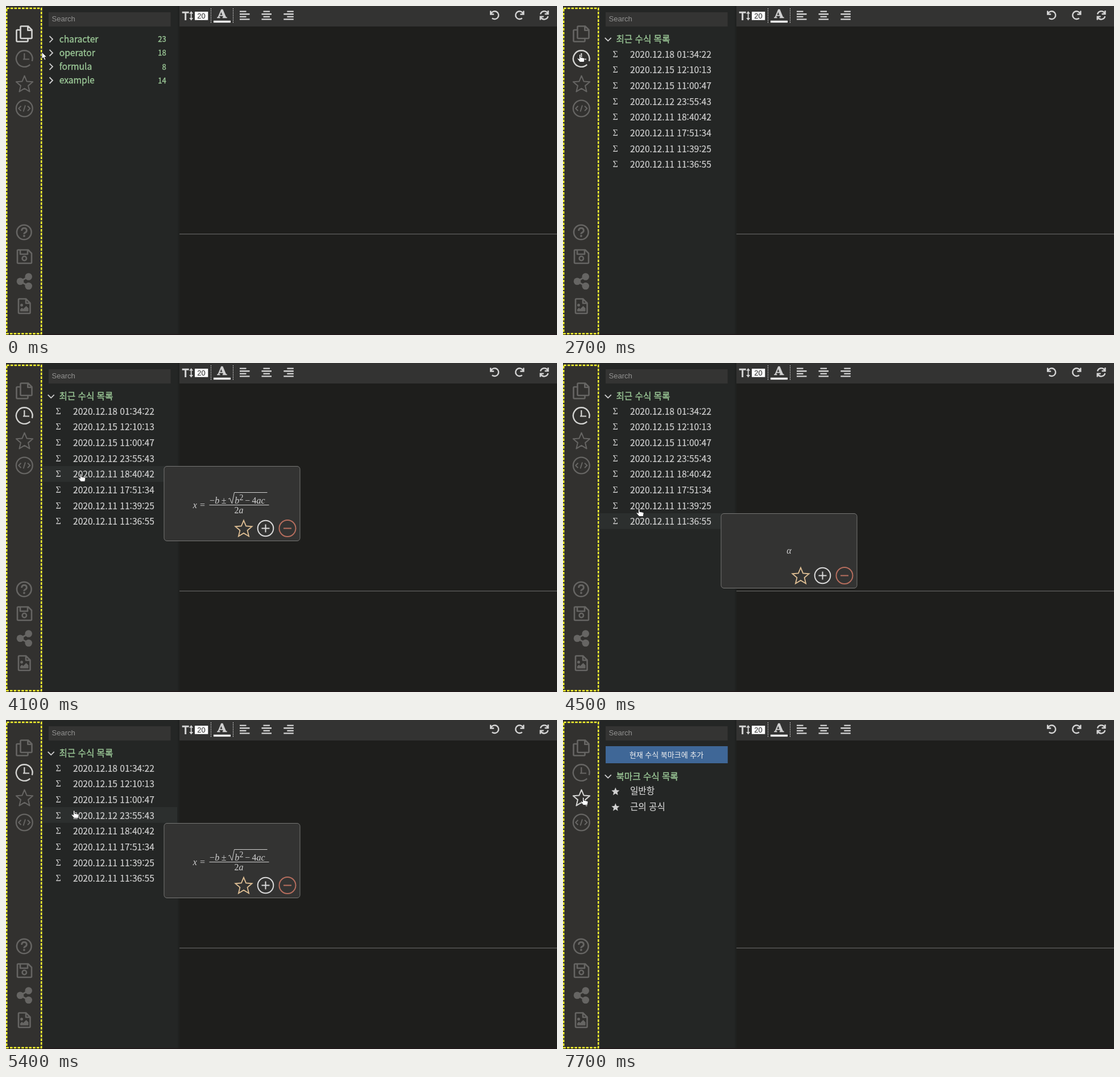
Write an HTML page that moves like this. It is 969 px wide and 578 px high and loops after 8000 ms.

```html
<!DOCTYPE html>
<html lang="ko">
<head>
<meta charset="utf-8">
<title>Formula editor</title>
<style>
html, body { margin: 0; width: 100%; height: 100%; overflow: hidden; background: #1e1e1c; }
svg { display: block; }
text { font-family: "Noto Sans CJK KR", "Noto Sans CJK JP", "Noto Sans CJK", sans-serif; font-size: 15.6px; fill: #d0d0d0; }
.arial { font-family: "Liberation Sans", Arial, sans-serif; font-size: 13px; }
.serif { font-family: "Liberation Serif", Times, serif; font-size: 16px; }
.it { font-style: italic; }
.green { fill: #9bc897; stroke: #9bc897; stroke-width: .35; }
.date { stroke: #d0d0d0; stroke-width: .2; }
.count { font-size: 13.1px; text-anchor: end; }
.line { fill: none; stroke: #d0d0d0; stroke-width: 1.8; }
.icon { color: #666563; }
.icon.on { color: #d4d4d2; }
.icon, .tools { fill: none; stroke: currentColor; stroke-width: 2.6; stroke-linejoin: round; }
.icon .solid { fill: currentColor; stroke: none; }
.tools { color: #d4d4d4; stroke-width: 2.4; stroke-linejoin: miter; }
.over text { fill: #c4e2c0; }
</style>
</head>
<body>
<svg width="969" height="578" viewBox="0 0 969 578">
  <rect width="969" height="578" fill="#1e1e1c"/>
  <rect width="65" height="578" fill="#32312f"/>
  <rect x="65" width="240" height="578" fill="#242625"/>
  <rect x="302" width="3" height="578" fill="#202221"/>
  <rect x="305" width="664" height="36" fill="#333332"/>
  <rect x="305" y="400" width="664" height="1.2" fill="#636362"/>
  <rect y="576.5" width="969" height="1.5" fill="#22181b"/>
  <rect x="75" y="11" width="214.5" height="25" fill="#343433"/>
  <text class="arial" x="80.5" y="27.3" style="fill:#929291">Search</text>

  <g class="icon" id="files">
    <path d="M27 35.5h12l6.5 6.5v13.5q0 1.5-1.5 1.5h-17q-1.5 0-1.5-1.5V37q0-1.5 1.5-1.5zM38.3 36v6.7h7M25 42h-5q-1.5 0-1.5 1.5V61q0 1.5 1.5 1.5h17q1.5 0 1.5-1.5v-4"/>
  </g>
  <g class="icon" id="clock">
    <path d="M42.2 102.8A14.3 14.3 0 1 1 45.9 96.8" stroke-width="2.4"/>
    <path d="M32.3 83v10.7M30 93.5h11" stroke-width="2.2"/>
  </g>
  <g class="icon" id="star"><path class="star" transform="translate(32.5 138)" stroke-width="2"/></g>
  <g class="icon">
    <circle cx="32.3" cy="180" r="14.4" stroke-width="2.3"/>
    <path d="M26.5 175.8l-4.3 4.2 4.3 4.2M38 175.8l4.3 4.2-4.3 4.2M34 174.5l-3.5 11" stroke-width="2"/>
  </g>
  <g class="icon">
    <circle cx="31.8" cy="397.5" r="12.8"/>
    <path d="M27.5 394.8q.4-4.5 4.5-4.5t4.3 3.9q0 2.500-2.300 3.700t-2 2.800" stroke-width="3"/>
    <circle class="solid" cx="31.9" cy="404" r="1.9"/>
  </g>
  <g class="icon">
    <path d="M21.5 428.5H39l6 6v16q0 1.500-1.500 1.500h-22q-1.500 0-1.500-1.500V430q0-1.500 1.500-1.500zM25 429v7h13v-7"/>
    <circle cx="32.3" cy="443.5" r="3.7"/>
  </g>
  <g class="icon">
    <path d="M39.5 475.500L25 483.800l14.500 8.200" stroke-width="3"/>
    <circle class="solid" cx="39.7" cy="475.5" r="6.3"/>
    <circle class="solid" cx="25" cy="483.8" r="6.3"/>
    <circle class="solid" cx="39.7" cy="492" r="6.3"/>
  </g>
  <g class="icon">
    <path d="M23.500 514.500H35l7.500 7.500v16.500q0 1.500-1.500 1.500H23.500q-1.500 0-1.500-1.500V516q0-1.500 1.500-1.500zM35 515v7.300h7.300"/>
    <circle class="solid" cx="27.5" cy="525.5" r="2.5"/>
    <path class="solid" d="M25 536.500V533l3-3 2.200 2.200 5.300-5.300 4 4v5.600z"/>
  </g>

  <g class="tools">
    <path d="M309.700 11.300h12M315.700 11v14" stroke-width="3"/>
    <path d="M325.700 12v11" stroke-width="1.8"/>
    <path d="M325.700 9l3.500 4.500h-7zM325.700 25.500l3.500-4.500h-7z" fill="currentColor" stroke="none"/>
    <rect x="332" y="10" width="23.3" height="14.7" fill="#fff" stroke="none"/>
    <path d="M360.500 4v27M399.500 4v27" stroke="#e8e8e8" stroke-width="1" stroke-dasharray="1.5 1.5"/>
    <rect x="365" y="25.7" width="30" height="3.5" fill="#fff" stroke="none"/>
    <path d="M411 9.600h11.500M411 14.300h17.500M411 18.900h11.500M411 23.400h17.500"/>
    <path d="M452.500 9.600H464M449.500 14.300H467M452.500 18.900H464M449.500 23.400H467"/>
    <path d="M494.300 9.600h11.500M488.300 14.300h17.500M494.300 18.900h11.500M488.300 23.400h17.500"/>
    <g id="undo"><path d="M852.200 8.500v6h6M853 13.500a6.900 6.900 0 1 1 1.800 7.800"/></g>
    <use href="#undo" transform="matrix(-1 0 0 1 1762.5 0)"/>
    <g id="half"><path d="M940 14.500a6.800 6.800 0 0 1 12.600-1.800M953.500 8v6h-6"/></g>
    <use href="#half" transform="rotate(180 946.6 16.3)"/>
  </g>
  <text class="arial" x="343.6" y="21.6" text-anchor="middle" style="fill:#2a2a2a">20</text>
  <text x="380" y="21.3" text-anchor="middle" stroke="#d0d0d0" stroke-width=".7" style="font:bold 21px 'DejaVu Serif',serif">A</text>

  <g id="tree"></g>
  <g id="recent">
    <rect id="hilite" x="65" width="236" height="27.7" fill="#2c2f2e"/>
    <path class="line" d="M73.700 55.800l5.500 5.500 5.500-5.500"/>
    <text class="green" x="93.5" y="64">최근 수식 목록</text>
    <g id="dates"></g>
  </g>
  <g id="marks">
    <rect x="75" y="46" width="214.7" height="30" fill="#3f6797"/>
    <text x="182" y="66" text-anchor="middle" style="font-size:13px;fill:#f2f2f2">현재 수식 북마크에 추가</text>
    <path class="line" d="M73.700 96.300l5.500 5.500 5.500-5.500"/>
    <text class="green" x="93.5" y="104.5">북마크 수식 목록</text>
    <path class="star" transform="translate(92.3 126) scale(.48)" fill="#d0d0d0"/>
    <path class="star" transform="translate(92.3 153.7) scale(.48)" fill="#d0d0d0"/>
    <text class="date" x="118" y="130.3">일반항</text>
    <text class="date" x="118" y="158">근의 공식</text>
  </g>

  <g id="popup">
    <rect id="card" x="278" y=".5" width="239" height="131" rx="5" fill="#333332" stroke="#777775"/>
    <g id="root">
      <g id="frac"></g>
      <g id="lhs">
        <text class="serif it" x="328.8" y="73.5">x</text>
        <text class="serif" x="341" y="73.5">=</text>
      </g>
    </g>
    <text class="serif it" id="alpha" x="397.5" y="71" text-anchor="middle">α</text>
    <g id="actions" fill="none" stroke-width="2">
      <path class="star" transform="translate(418 111)" stroke="#dfbf94" stroke-width="1.8"/>
      <circle cx="456.5" cy="109.5" r="13.8" stroke="#dadada"/>
      <path d="M449.500 109.500h14M456.500 102.500v14" stroke="#dadada"/>
      <circle cx="495" cy="109.5" r="14.5" stroke="#b76e5e"/>
      <path d="M488 109.500h14" stroke="#b76e5e"/>
    </g>
  </g>

  <rect x="1.2" y="4" width="61" height="571.7" fill="none" stroke="#ffff2e" stroke-width="2.4" stroke-dasharray="4.5 2.2"/>

  <g id="cursor" fill="#fff" stroke="#1a1a1a" stroke-width=".8" stroke-linejoin="round">
    <path id="arrow" d="M0 0v12l2.800-2.500 2 4.600 2.100-.9-2-4.500h3.800z"/>
    <path id="hand" d="M3.500 1.200q0-1.200 1.200-1.200t1.200 1.200v4l6.100 1.200q1.300.4 1 2l-1 5.100H4.800L.4 8.200q-.6-1.200.6-1.600l2.500 1.400z"/>
  </g>
</svg>
<script>
const $ = id => document.getElementById(id);
const show = (id, on) => $(id).style.display = on ? '' : 'none';

const LOOP = 8000, STEP = 100, TOP = 71, ROW = 27.68;

// five-pointed star
let star = 'M';
for (let i = 0; i < 10; i++) {
  const r = i % 2 ? 6.9 : 15.4, a = i * Math.PI / 5;
  star += `${(r * Math.sin(a)).toFixed(2)} ${(-r * Math.cos(a)).toFixed(2)} `;
}
document.querySelectorAll('.star').forEach(p => p.setAttribute('d', star + 'z'));

const groups = [['character', 23], ['operator', 18], ['formula', 8], ['example', 14]];
$('tree').innerHTML = groups.map(([name, n], i) => {
  const y = 24.15 * i;
  return `<g><path class="line" d="M76.5 ${52.8 + y}l5.5 5.5-5.5 5.5"/>
    <text class="green" x="93.7" y="${63.8 + y}">${name}</text>
    <text class="green count" x="281.8" y="${63.3 + y}">${n}</text></g>`;
}).join('');
const operator = $('tree').children[1];

const dates = ['18 01:34:22', '15 12:10:13', '15 11:00:47', '12 23:55:43',
  '11 18:40:42', '11 17:51:34', '11 11:39:25', '11 11:36:55'];
$('dates').innerHTML = dates.map((d, i) => {
  const y = 90.5 + ROW * i;
  return `<text class="serif" x="87.5" y="${y - 1}">Σ</text><text class="date" x="118" y="${y}">2020.12.${d}</text>`;
}).join('');

const glyph = (s, x, y, italic, size = 16) =>
  `<text class="serif ${italic ? 'it' : ''}" x="${x}" y="${y}" style="font-size:${size}px">${s}</text>`;
$('frac').innerHTML =
  glyph('−', 345.5, 66) + glyph('b', 354.8, 66, true) + glyph('±', 366.2, 66) +
  glyph('b', 389.8, 66, true) + glyph('2', 398, 60, false, 14) + glyph('−', 407.8, 66) +
  glyph('4', 420, 66) + glyph('ac', 428, 66, true) +
  glyph('2', 389, 82.5) + glyph('a', 397, 82.5, true) +
  '<path class="line" style="stroke-width:1" d="M345 68.500h105M378.500 58l2.500-1.500 4 9.500 4-19.500h58"/>';

// time, x, y of the pointer's top left corner
const path = [
  [0, 63, 81], [100, 62, 79.5], [800, 62, 79.5], [900, 42, 84], [1000, 23, 85.5],
  [1100, 23, 85.5], [1200, 19, 85.5], [2600, 19, 85.5], [2700, 25, 85], [2800, 52, 78],
  [2900, 88, 76], [3000, 108, 78], [3200, 108, 78], [3300, 113, 90], [3400, 118, 102],
  [3500, 118, 102], [3600, 124, 118], [4500, 129, 256], [4600, 131, 262], [4700, 129, 250],
  [4900, 124, 215], [5000, 124, 215], [5400, 115, 159], [5500, 115, 159], [6300, 31, 136], [LOOP, 31, 136]
];

function pointer(t) {
  const i = path.findIndex(p => p[0] > t);
  const [t0, x0, y0] = path[i - 1], [t1, x1, y1] = path[i];
  const k = (t - t0) / (t1 - t0);
  return [x0 + (x1 - x0) * k, y0 + (y1 - y0) * k];
}

const panelAt = t => t < 2300 ? 0 : t < 7700 ? 1 : 2;
const rowTop = row => Math.round(TOP - .6 + ROW * row);

function rowAt(t) {
  const [x, y] = pointer(t);
  return panelAt(t) === 1 && x > 66 ? Math.floor((y + 9 - TOP) / ROW) : -1;
}

function drawPopup(row) {
  show('popup', row >= 0);
  if (row < 0) return;
  const extra = row ? 0 : 20;
  $('popup').setAttribute('transform', `translate(0 ${rowTop(row)})`);
  $('card').setAttribute('height', 131 + extra);
  $('actions').setAttribute('transform', `translate(0 ${extra})`);
  const full = row === 3 || row === 4;
  show('root', row < 5);
  show('lhs', full);
  show('alpha', row >= 5);
  $('frac').setAttribute('transform', `translate(${full ? 12.5 : 0} 0)`);
}

function render(time) {
  const t = Math.floor(time % LOOP / STEP) * STEP;
  const panel = panelAt(t), [x, y] = pointer(t), row = rowAt(t);
  ['tree', 'recent', 'marks'].forEach((id, i) => show(id, i === panel));

  const inIcons = x + 5 > 17 && x + 5 < 48;
  const onClock = inIcons && y > 76 && y < 108, onStar = inIcons && y > 122 && y < 152;
  [false, onClock, onStar].forEach((hover, i) =>
    $(['files', 'clock', 'star'][i]).classList.toggle('on', hover || i === panel));

  const onTree = t >= 100 && t < 900;
  operator.classList.toggle('over', onTree);
  show('hilite', row >= 0);
  $('hilite').setAttribute('y', rowTop(row));
  // the card trails the pointer on the way up
  drawPopup(row < 0 ? -1 : Math.max(row, rowAt(t - 2 * STEP)));

  const hand = onTree || row >= 0 || onClock || onStar;
  show('hand', hand);
  show('arrow', !hand);
  $('cursor').setAttribute('transform', `translate(${x} ${y})`);
}

let start;
function tick(now) {
  start ??= now;
  render(now - start);
  requestAnimationFrame(tick);
}
render(0);
requestAnimationFrame(tick);
</script>
</body>
</html>
```
